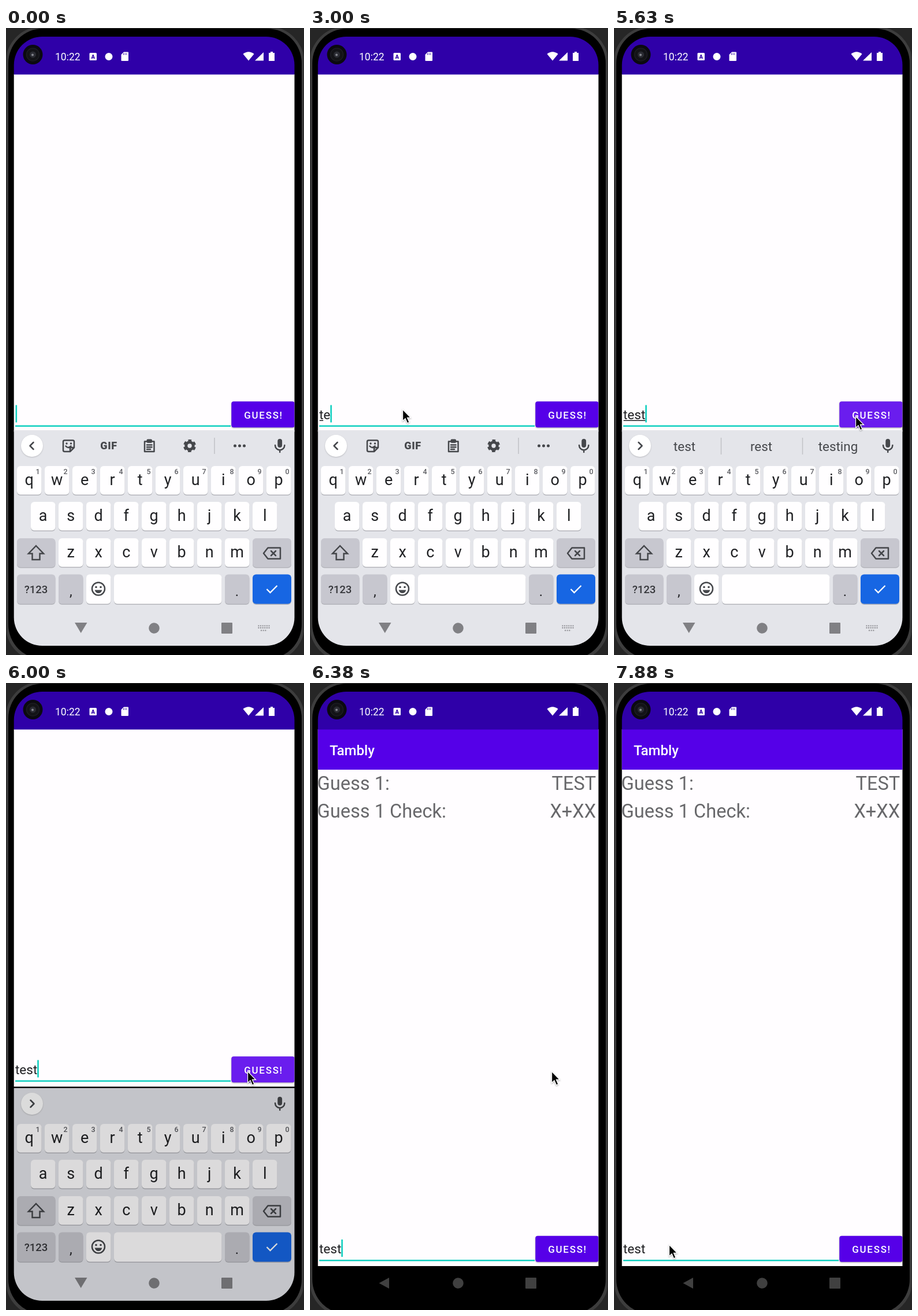
An HTML page for the animation above (8 s loop, 516 by 1085 pixels).

```html
<!DOCTYPE html>
<html lang="en">
<head>
<meta charset="utf-8">
<title>Guess the word</title>
<style>
  html, body { margin: 0; width: 100%; height: 100%; overflow: hidden; background: #262626; }
  svg { display: block; width: 100vw; height: 100vh; }
  text { font-family: Roboto, "Noto Sans", sans-serif; }
  .mid { text-anchor: middle; }
  .end { text-anchor: end; }
  .med { font-weight: 500; }
  .line { fill: none; stroke: #45474b; stroke-width: 2.5; stroke-linecap: round; stroke-linejoin: round; }
  .ink { fill: #45474b; }
  .raised { filter: drop-shadow(0 1.5px 1.2px rgba(0, 0, 0, .35)); }
</style>
</head>
<body>
<svg viewBox="0 0 516 1085" preserveAspectRatio="none">
  <defs>
    <clipPath id="screen"><rect x="13.7" y="15" width="485.8" height="1054" rx="49"/></clipPath>
    <clipPath id="window"><rect x="13" y="80" width="487" height="990"/></clipPath>
    <linearGradient id="rim">
      <stop offset="0" stop-color="#2a2a2a"/><stop offset=".008" stop-color="#3e3e3e"/>
      <stop offset=".5" stop-color="#303030"/><stop offset=".992" stop-color="#3e3e3e"/>
      <stop offset="1" stop-color="#2a2a2a"/>
    </linearGradient>
  </defs>

  <rect width="516" height="1085" fill="#262626"/>
  <rect x="-1" y="-3" width="518" height="1100" rx="64" fill="url(#rim)"/>
  <rect x="4" y="1" width="508" height="1091" rx="60"/>

  <g clip-path="url(#screen)">
    <g clip-path="url(#window)">
      <g id="app">
        <rect x="13" y="80" width="487" height="929" fill="#fffdff"/>
        <rect x="13" y="80" width="487" height="70" fill="#5500e8"/>
        <text class="med" x="34" y="125" font-size="24" fill="#fff">Tambly</text>
        <g font-size="32.6" fill="#68686b">
          <text x="12.6" y="185">Guess 1:</text><text class="end" x="495.2" y="185">TEST</text>
          <text x="12.6" y="233">Guess 1 Check:</text><text class="end" x="495.2" y="233">X+XX</text>
        </g>
        <text id="word" x="16" y="987" font-size="22.5" fill="#1d1d20"></text>
        <rect id="under" x="16.5" y="989" height="1.5" fill="#1d1d20"/>
        <rect id="caret" y="963" width="2.6" height="30" fill="#10cfc0"/>
        <rect x="16" y="998" width="373" height="2.5" fill="#10cfc0"/>
        <g class="raised">
          <rect id="button" x="390.3" y="956.700" width="109.500" height="45" rx="4"/>
          <text class="med" x="412.3" y="986" font-size="17" letter-spacing="1.7" fill="#fff">GUESS!</text>
        </g>
      </g>
    </g>

    <rect x="13" y="15" width="487" height="65.500" fill="#2f00a8"/>
    <g fill="#fff">
      <text x="85" y="56" font-size="17.5">10:22</text>
      <rect x="144.5" y="43" width="12.5" height="13" rx="1.5"/>
      <text class="mid" x="150.7" y="53" font-size="9.5" font-weight="900" fill="#2f00a8">A</text>
      <circle cx="178" cy="49.5" r="6.5"/>
      <path d="M204 41.5H211Q212 41.5 212 42.5V56Q212 57 211 57H200.500Q199.500 57 199.500 56V46Z"/>
      <path d="M420 56.500L410.500 45Q420 37.500 429.500 45Z"/>
      <path d="M446 42V56.500H431Z"/>
      <path d="M458 41H462V43H465V57H455V43H458Z"/>
    </g>
    <path d="M203.500 43.500v3M206.200 43.500v3M208.900 43.500v3" stroke="#2f00a8"/>

    <g id="darkNav" fill="#404040">
      <path id="back"/><circle cx="256.500" cy="1038.500" r="9.300"/><rect x="373" y="1029" width="19" height="19" rx="1"/>
    </g>

    <g id="board">
      <g id="panel">
        <rect x="13" y="696" width="487" height="380" fill="#e4e5ea"/>
        <circle cx="45" cy="723" r="19" fill="#fff" style="filter:drop-shadow(0 1px 1px rgba(0,0,0,.18))"/>
        <path id="chevron" class="line"/>
        <g id="tools">
          <path class="line" d="M101 713.500H115.500Q118 713.500 118 716V726L111 733H101.500Q99 733 99 730.500V716Q99 713.500 101.500 713.500M118 726H113.500Q111 726 111 728.500V733M103.500 723.500Q107.500 728.500 112.500 723.500"/>
          <circle class="ink" cx="105" cy="719" r="1.700"/><circle class="ink" cx="112.500" cy="719" r="1.700"/>
          <text class="mid ink" x="178" y="729" font-size="18" font-weight="900" letter-spacing=".6">GIF</text>
          <path class="line" d="M240 715.500H256.500V733H240ZM244 721.500H252.500M244 725.300H252.500M244 729H250"/>
          <rect class="ink" x="243.500" y="711.500" width="9.500" height="6.500" rx="2"/>
          <g fill="none" stroke="#45474b">
            <circle cx="318" cy="723" r="6.200" stroke-width="5"/>
            <circle cx="318" cy="723" r="9" stroke-width="4" stroke-dasharray="5.400 4.025" stroke-dashoffset="-2"/>
          </g>
          <path d="M361 709V737" stroke="#c0c1c6" stroke-width="1.500"/>
          <g class="ink"><circle cx="396.500" cy="723" r="2.500"/><circle cx="404.500" cy="723" r="2.500"/><circle cx="412.500" cy="723" r="2.500"/></g>
        </g>
        <g id="hints" font-size="22.400" class="mid ink">
          <text x="122" y="732">test</text><text x="255" y="732">rest</text><text x="388" y="732">testing</text>
          <path d="M185.500 709V738M326.500 709V738" stroke="#c0c1c6" stroke-width="1.500"/>
        </g>
        <rect class="ink" x="470.300" y="711" width="7.800" height="15" rx="3.900"/>
        <path class="line" d="M466 722a8.200 8.200 0 0 0 16.400 0M474.200 730.500V734"/>
        <g id="keys"></g>
        <path class="line" d="M52 896L65 909.500H58.500V920H45.500V909.500H39Z" style="stroke-linejoin:miter"/>
        <path class="line" d="M453.500 899.500H475V918.500H453.500L446 909ZM459 905l8 8m0-8l-8 8" stroke-width="2.200"/>
        <circle class="line" cx="160" cy="970.500" r="11"/>
        <circle class="ink" cx="156" cy="967.500" r="1.800"/><circle class="ink" cx="164" cy="967.500" r="1.800"/>
        <path class="ink" d="M153.500 972.500H166.500Q164.500 978 160 978Q155.500 978 153.500 972.500Z"/>
        <path d="M451.500 971l6 6l12-12" fill="none" stroke="#fff" stroke-width="2.300"/>
      </g>
      <g fill="#808084">
        <path d="M119 1029H140.500L129.700 1047Z"/><circle cx="256.500" cy="1038.500" r="9.300"/><rect x="373" y="1029" width="19" height="19" rx="1"/>
        <path id="switcher" d="M436.500 1034.500H456.500M436.500 1038H456.500M441 1042.500H452" stroke="#8b8b90" stroke-width="2" stroke-dasharray="2 1.600"/>
      </g>
    </g>
  </g>

  <circle cx="46.500" cy="46" r="17" fill="#0b0a10"/>
  <circle cx="46.500" cy="46" r="11" fill="#131317" stroke="#1d1d22" stroke-width="1.500"/>
  <circle cx="46.500" cy="46" r="5.500" fill="#2b2c33"/>
  <circle cx="46" cy="46.500" r="2" fill="#85868e"/>

  <path id="mouse" d="M0 0V20L4.500 15.800L8 23.800L11.400 22.300L8 14.500H14Z" fill="#000" stroke="#fff" stroke-width="1.300"
    style="filter:drop-shadow(0 1px 1px rgba(0,0,0,.35))"/>
</svg>
<script>
const $ = id => document.getElementById(id);
const LOOP = 8000, TICK = 125, PAN = -310.5;

// Keyboard
const key = (x, y, w, h, fill) =>
  `<rect x="${x}" y="${y + 1.5}" width="${w}" height="${h}" rx="6" fill="#b3b4ba"/>` +
  `<rect x="${x}" y="${y}" width="${w}" height="${h}" rx="6" fill="${fill}"/>`;
const label = (x, y, size, s, extra = 'fill="#202124"') =>
  `<text class="mid" x="${x}" y="${y}" font-size="${size}" ${extra}>${s}</text>`;
const white = '#fffeff', gray = '#c7c7cf';

function row(letters, x0, y, digits) {
  return [...letters].map((c, i) => {
    const x = x0 + i * 48;
    return key(x, y, 42.5, 49.5, white) + label(x + 21.2, y + 33, 27, c) +
      (digits ? label(x + 36, y + 13.5, 12.5, (i + 1) % 10, 'fill="#5c5d62" font-weight="500"') : '');
  }).join('');
}

$('keys').innerHTML =
  row('qwertyuiop', 19, 758, true) + row('asdfghjkl', 43, 820) + row('zxcvbnm', 91, 883) +
  key(19, 883, 66.5, 50, gray) + key(427, 883, 67, 50, gray) +
  key(19, 945.5, 66.5, 51, gray) + key(91, 945.5, 42.5, 51, gray) + key(139, 945.5, 42.5, 51, white) +
  key(187, 945.5, 186.5, 51, white) + key(379, 945.5, 42.5, 51, gray) + key(427, 945.5, 67, 51, '#1766e3') +
  label(52, 978, 18.5, '?123', 'fill="#36373b" font-weight="500"') +
  label(112.3, 983, 24, ',') + label(400, 983, 24, '.');

// Steps: [time, value], each held until the next
const steps = {
  word: [[0, ''], [2875, 't'], [3000, 'te'], [3250, 'tes'], [3500, 'test']],
  under: [[0, 0], [3000, 6.5], [3125, 19], [3250, 31], [3500, 38], [5875, 0]],
  end: [[0, 16.5], [2875, 23], [3000, 35.2], [3250, 47], [3500, 54.2]],
  caret: [[0, 1], [5000, 0], [5250, 1], [7625, 0]],
  strip: [[0, 'tools'], [3125, 'hints'], [5875, 'none']],
  button: [[0, '#5600e8'], [5500, '#5f0fea'], [5625, '#6a1dee'], [6375, '#5600e8']],
  board: [[0, 1], [6000, .86], [6125, 0]],
  drop: [[0, 0], [6000, 5]],
  back: [[0, 'M119 1029H140.500L129.700 1047Z'], [6375, 'M137 1029V1048L119.500 1038.500Z']]
};
const held = (name, t) => steps[name].filter(s => s[0] <= t).pop()[1];

// Pointer path: [time, x, y]
const path = [
  [2000, 250, 600], [2750, 160.5, 660], [3625, 160.5, 660], [4500, 418.5, 672],
  [6875, 418.5, 672], [7375, 86, 966], [7500, 86, 966], [7875, 95.5, 972]
];
const ease = u => u * u * (3 - 2 * u);
function pointer(t) {
  const i = path.findIndex(p => p[0] > t);
  if (i < 0) return path[path.length - 1].slice(1);
  const a = path[i - 1], b = path[i], u = ease((t - a[0]) / (b[0] - a[0]));
  return [a[1] + (b[1] - a[1]) * u, a[2] + (b[2] - a[2]) * u];
}

const set = (id, name, v) => $(id).setAttribute(name, v);
const show = (id, on) => set(id, 'visibility', on ? 'visible' : 'hidden');

function draw(time) {
  const t = Math.floor((time % LOOP + 5) / TICK) * TICK;
  const pan = Math.min(1, Math.max(0, (t - 6125) / 250));
  set('app', 'transform', `translate(0 ${PAN * (1 - pan) ** 2})`);

  $('word').textContent = held('word', t);
  set('under', 'width', held('under', t));
  set('caret', 'x', held('end', t));
  show('caret', held('caret', t));
  set('button', 'fill', held('button', t));

  const strip = held('strip', t);
  show('tools', strip === 'tools');
  show('hints', strip === 'hints');
  set('chevron', 'd', strip === 'tools' ? 'M47.500 717l-6 6l6 6' : 'M42.500 717l6 6l-6 6');

  const alpha = held('board', t);
  set('board', 'opacity', alpha);
  set('panel', 'transform', `translate(0 ${held('drop', t)})`);
  show('switcher', alpha === 1);
  show('darkNav', alpha === 0);
  set('back', 'd', held('back', t));

  show('mouse', t >= path[0][0]);
  if (t >= path[0][0]) set('mouse', 'transform', `translate(${pointer(t)})`);
}

const start = performance.now();
function loop() {
  draw(performance.now() - start);
  requestAnimationFrame(loop);
}
loop();
</script>
</body>
</html>
```
